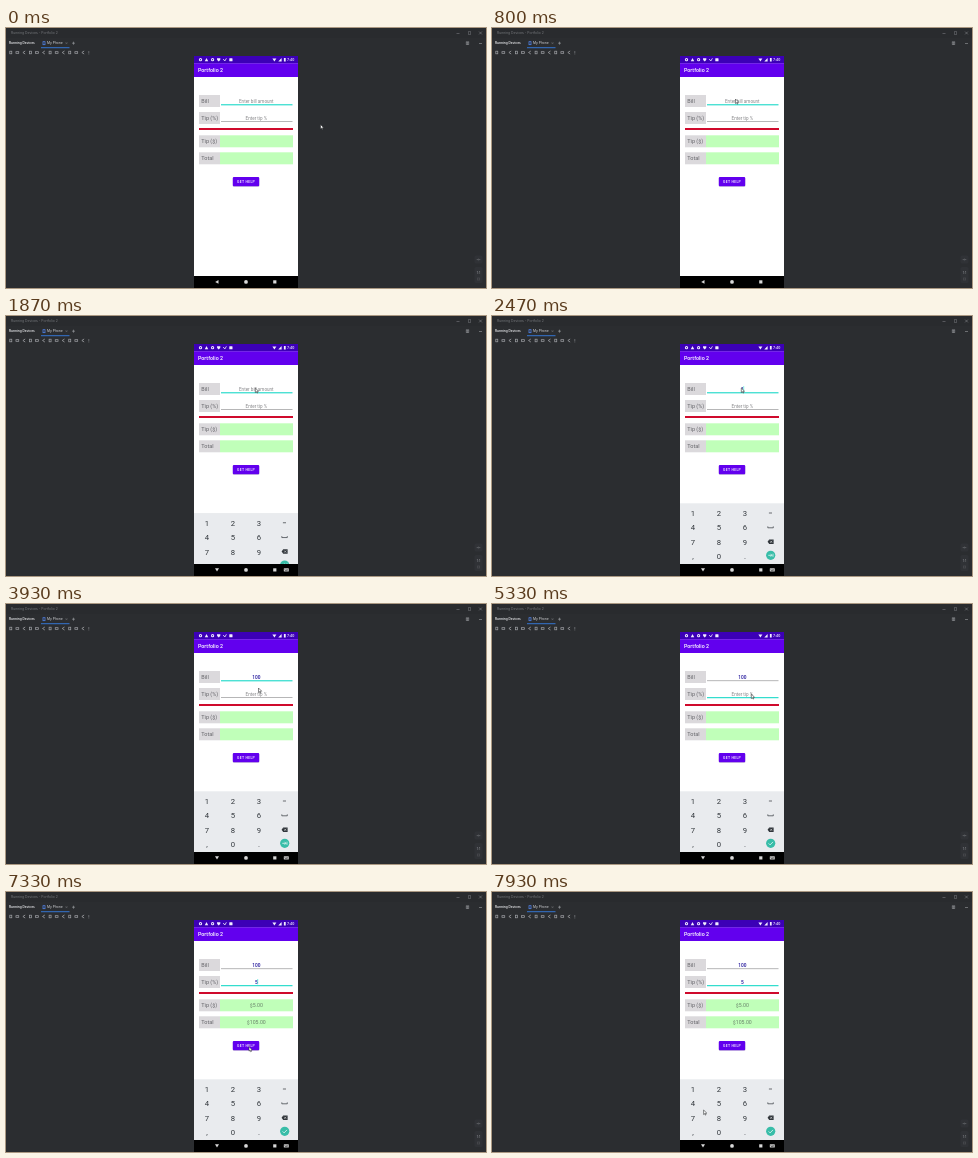
An HTML page with a canvas that plays this animation: 480 by 260 pixels, repeating every 8000 ms.

```html
<!DOCTYPE html>
<html lang="en">
<head>
<meta charset="utf-8">
<title>Tip calculator</title>
<style>
html, body { margin: 0; width: 100%; height: 100%; overflow: hidden; background: #2b2d30; }
canvas { display: block; width: 480px; height: 260px; }
</style>
</head>
<body>
<canvas id="stage" width="480" height="260"></canvas>
<script>
const c = document.getElementById('stage').getContext('2d');
const LOOP = 8000, STEP = 1000 / 15;
const TEAL = '#03d5c2', PURPLE = '#6200ee', GREY = '#77787c';

// Pointer path: [step, x, y]
const PATH = [
  [0, 314.5, 96.5], [4, 314.5, 96.5], [9, 262, 80], [11, 241, 72], [13, 246, 70],
  [19, 246, 70], [21, 249.3, 72], [52, 249.3, 72], [56, 252, 82], [58, 252, 82],
  [59, 252.5, 84], [62, 259.3, 90], [99, 259.3, 90], [100, 262, 98],
  [102, 263.6, 121.5], [104, 267, 146], [107, 240, 155], [109, 240, 155],
  [112, 249, 154], [114, 246, 153], [116, 246, 153], [119, 211.6, 218]
];
// Steps at which the caret is visible: [from, to)
const CARET_ON = [[20, 27], [35, 53], [60, 68], [71, 80], [87, 98], [105, 113]];

function rect(x, y, w, h, color) {
  c.fillStyle = color;
  c.fillRect(x, y, w, h);
}

function text(str, x, y, size, color, align = 'left', weight = 400, family = 'Roboto') {
  c.font = `${weight} ${size}px ${family}, sans-serif`;
  c.textAlign = align;
  c.fillStyle = color;
  c.fillText(str, x, y);
}

function poly(points, color) {
  c.beginPath();
  points.forEach(([x, y]) => c.lineTo(x, y));
  c.closePath();
  c.fillStyle = color;
  c.fill();
}

function line(points, color, width = 0.6) {
  c.beginPath();
  points.forEach(([x, y], i) => i ? c.lineTo(x, y) : c.moveTo(x, y));
  c.strokeStyle = color;
  c.lineWidth = width;
  c.stroke();
}

function disc(x, y, r, color) {
  c.beginPath();
  c.arc(x, y, r, 0, Math.PI * 2);
  c.fillStyle = color;
  c.fill();
}

function ring(x, y, w, h, color, width = 0.6) {
  c.strokeStyle = color;
  c.lineWidth = width;
  c.strokeRect(x - w / 2, y - h / 2, w, h);
}

function rounded(x, y, w, h, r, color) {
  c.beginPath();
  c.roundRect(x, y, w, h, r);
  c.fillStyle = color;
  c.fill();
}

function cross(x, y, r, color) {
  line([[x - r, y - r], [x + r, y + r]], color, 0.5);
  line([[x + r, y - r], [x - r, y + r]], color, 0.5);
}

function drawWindow() {
  rect(0, 0, 480, 260, '#2b2d30');
  rect(0, 0, 480, 10, '#292b2e');
  text('Running Devices - Portfolio 2', 5, 6.3, 3.4, '#75777b', 'left', 400, 'Inter');
  line([[450.5, 5.5], [453.5, 5.5]], GREY);
  ring(463.5, 5, 2.5, 2.5, GREY, 0.5);
  cross(474.5, 5, 1.4, '#909296');

  text('Running Devices', 3, 16.3, 3.2, '#e4e5e8', 'left', 600, 'Inter');
  ring(38, 15.2, 2, 3, '#548af7', 0.7);
  text('My Phone', 41, 16.3, 3.3, '#d5d7db', 'left', 400, 'Inter');
  cross(60.5, 15.2, 0.9, GREY);
  line([[66, 15.2], [69, 15.2]], '#a0a2a7');
  line([[67.5, 13.7], [67.5, 16.7]], '#a0a2a7');
  rect(35, 19.2, 28.5, 1, '#3574d0');
  ring(461.5, 15.2, 2.6, 2.6, '#9a9ca0', 0.6);
  line([[461.5, 14], [461.5, 16.5]], '#9a9ca0');
  line([[473, 15.5], [476, 15.5]], '#9a9ca0');

  for (let i = 0; i < 12; i++) {
    const x = 4.8 + i * 6.55;
    if (i % 3 === 1) ring(x, 24.5, 2.8, 1.6, '#a2a4a8', 0.7);
    else if (i % 3 === 2) line([[x + 1.3, 23], [x - 1, 24.5], [x + 1.3, 26]], '#a2a4a8', 0.8);
    else ring(x, 24.5, 2, 2.6, '#a2a4a8', 0.7);
  }
  for (let i = 0; i < 3; i++) rect(82.5, 23 + i * 1.3, 0.7, 0.7, '#a2a4a8');

  rounded(468.5, 227.5, 8, 8, 1.5, '#303236');
  line([[470.7, 231.6], [474.3, 231.6]], '#77797d');
  line([[472.5, 230], [472.5, 233.2]], '#55575b', 0.4);
  rounded(468.5, 239, 8, 16, 1.5, '#303236');
  text('1:1', 472.5, 245.5, 3, '#85878b', 'center', 600, 'Inter');
  ring(472.5, 251, 2.5, 2, '#505256', 0.5);
}

function drawStatusBar() {
  rect(188, 28, 104, 7.5, '#3c00b6');
  const y = 31.7, w = '#f2edff';
  disc(194.5, y, 1.6, w);
  poly([[200.5, 30], [202.2, 33.3], [198.8, 33.3]], w);
  disc(206.6, y, 1.6, w);
  poly([[211, 30.2], [214.4, 30.2], [214.2, 32], [212.7, 33.5], [211.2, 32]], w);
  line([[217.2, 31], [218.8, 33], [220.4, 30.3]], w, 0.8);
  rounded(223.3, 30.3, 3.2, 3, 0.4, w);
  disc(194.5, y, 0.6, '#3c00b6');
  disc(206.6, y, 0.6, '#3c00b6');
  poly([[266.4, 30.5], [270.4, 30.5], [268.4, 33.5]], w);
  poly([[275.6, 30], [275.6, 33.4], [272.3, 33.4]], w);
  rect(277.9, 30, 1.8, 3.5, w);
  text('7:40', 281, 33.3, 3.7, w, 'left', 500);
}

function drawForm(step) {
  rect(188, 28, 104, 232, '#fff');
  drawStatusBar();
  rect(188, 35.3, 104, 13.7, PURPLE);
  text('Portfolio 2', 192, 44, 5.3, '#fff', 'left', 500);

  const done = step >= 90, tipFocused = step >= 71;
  [['Bill', 67], ['Tip (%)', 84], ['Tip ($)', 107.3], ['Total', 124.3]].forEach(([label, y], i) => {
    rect(193, y, 21, 12, '#dbd9dc');
    if (i > 1) rect(214, y, 73, 12, '#c0ffb9');
    text(label, 195.3, y + 7.8, 5.5, '#626267');
  });
  rect(193, 100, 94, 2, '#cf0a2c');

  const bill = step < 37 ? '' : step < 43 ? '1' : step < 45 ? '10' : '100';
  const tip = done ? '5' : '';
  drawField(bill, 'Enter bill amount', 74.6, !tipFocused, step);
  drawField(tip, 'Enter tip %', 91.5, tipFocused, step);

  if (done) {
    text('$5.00', 250.3, 115.2, 5.2, '#68816a', 'center');
    text('$105.00', 250.3, 132.2, 5.2, '#68816a', 'center');
  }

  rounded(226.8, 149.7, 26.6, 9.3, 1, '#d9d6de');
  rounded(226.8, 149, 26.4, 9.2, 1, PURPLE);
  c.letterSpacing = '0.25px';
  text('GET HELP', 240.1, 155, 3.5, '#fff', 'center', 500);
  c.letterSpacing = '0px';
}

function drawField(value, hint, base, focused, step) {
  if (value) text(value, 250.3, base, 4.8, '#21149b', 'center', 500);
  else text(hint, 250.3, base, 4.6, '#858588', 'center');
  if (focused) rect(215, base + 1.7, 71.5, 1, TEAL);
  else rect(215, base + 1.9, 71.5, 0.6, '#858588');
  if (focused && CARET_ON.some(([a, b]) => step >= a && step < b)) {
    rect(250.2 + value.length * 1.4, base - 4.5, 0.5, 5.4, TEAL);
  }
}

function drawKeyboard(step) {
  if (step < 26) return;
  const p = Math.min(1, (step - 25) / 5);
  c.save();
  c.beginPath();
  c.rect(188, 180, 104, 68);
  c.clip();
  c.translate(0, 61 * (1 - p) ** 2);
  rect(188, 187.3, 104, 61, '#e9ebee');
  const ink = '#31363b';
  ['123', '456', '789', ',0.'].forEach((row, r) => {
    [...row].forEach((key, k) => {
      text(key, 201 + k * 26, 199.8 + r * 14.5, 7.7, ink, 'center');
    });
  });
  line([[276.9, 197], [280, 197]], ink, 0.7);
  line([[275.8, 210.4], [275.8, 211.8], [281.3, 211.8], [281.3, 210.4]], ink, 0.7);
  poly([[275.6, 225.8], [277.2, 223.6], [281.6, 223.6], [281.6, 228], [277.2, 228]], ink);
  cross(279.2, 225.8, 1, '#fff');
  disc(278.7, 239.3, 4.6, '#38bda8');
  if (step >= 72) {
    line([[276.6, 239.4], [278.1, 240.9], [281, 237.9]], '#fff', 0.7);
  } else {
    line([[276.3, 239.3], [279.9, 239.3]], '#fff', 0.7);
    line([[278.5, 237.8], [280, 239.3], [278.5, 240.8]], '#fff', 0.6);
    line([[281, 237.7], [281, 240.9]], '#fff', 0.6);
  }
  c.restore();
}

function drawNav(step) {
  rect(188, 248, 104, 12, '#000');
  const ink = '#d8d8d8';
  if (step < 24) {
    poly([[209.2, 253.9], [212.5, 252], [212.5, 255.8]], ink);
  } else {
    poly([[209, 252.2], [213, 252.2], [211, 255.5]], ink);
    rounded(277.8, 252.2, 5, 3.4, 0.5, '#c8c8c8');
    for (let i = 0; i < 3; i++) rect(278.6 + i * 1.3, 253, 0.6, 0.6, '#222');
    rect(279, 254.5, 2.6, 0.5, '#222');
  }
  disc(240, 253.9, 1.9, ink);
  rect(267.2, 252.3, 3.2, 3.2, ink);
}

function pointerAt(step) {
  const i = Math.max(1, PATH.findIndex(k => k[0] >= step));
  const [s0, x0, y0] = PATH[i - 1], [s1, x1, y1] = PATH[i];
  const p = (step - s0) / (s1 - s0);
  return [x0 + (x1 - x0) * p, y0 + (y1 - y0) * p];
}

function drawPointer(step) {
  const [x, y] = pointerAt(step);
  const shape = [[0, 0], [0, 4.5], [1, 3.6], [1.7, 5.1], [2.4, 4.8], [1.8, 3.3], [3.2, 3.2]];
  const points = shape.map(([dx, dy]) => [x + dx, y + dy]);
  poly(points, '#fff');
  line([...points, points[0]], '#25272a', 0.55);
}

function draw(now) {
  const step = Math.min(119, Math.floor((now % LOOP + 5) / STEP));
  drawWindow();
  drawForm(step);
  drawKeyboard(step);
  drawNav(step);
  drawPointer(step);
}

let start;
function tick(now) {
  start ??= now;
  draw(now - start);
  requestAnimationFrame(tick);
}
draw(0);
requestAnimationFrame(tick);
</script>
</body>
</html>
```
